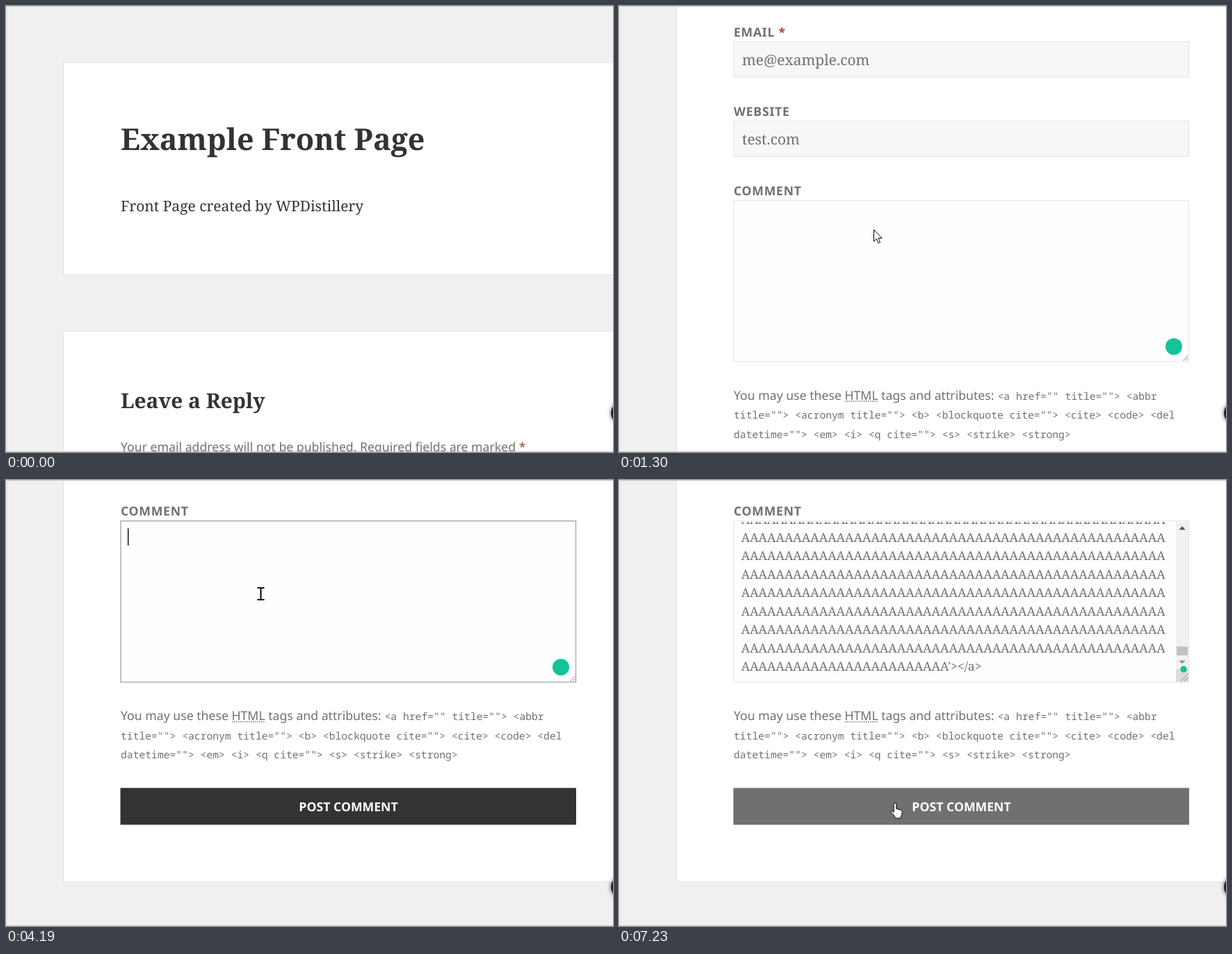
Animation of 873 by 641 pixels, one loop 8000 ms. Source, as an HTML page:

```html
<!DOCTYPE html>
<html lang="en">
<head>
<meta charset="utf-8">
<title>Comment form</title>
<style>
  html, body { margin: 0; width: 100%; height: 100%; overflow: hidden; background: #f0f0f0; }
  svg { display: block; width: 873px; height: 641px; text-rendering: geometricPrecision; }
  text { fill: #707070; font: 17.66px "Noto Sans", sans-serif; }
  .serif { font: 20.97px "Noto Serif", serif; }
  .title { font: bold 43px "Noto Serif", serif; }
  .subtitle { font: bold 29.78px "Noto Serif", serif; }
  .dark { fill: #333; }
  .label { font-weight: bold; letter-spacing: .04em; }
  .required { fill: #b3402c; }
  .code { font: 14.7px "Noto Sans Mono", monospace; }
  .card { fill: #fff; stroke: #e2e2e2; }
  .field { fill: #f7f7f7; stroke: #dfe3e3; }
  .autofill { fill: #fafdbd; stroke: #dfe2ae; }
  .submit { fill: #fff; font-weight: bold; text-anchor: middle; }
  #comment { fill: #fefefe; stroke: #e2e4e4; }
  #comment.focus { stroke: #b7b7b7; stroke-width: 1.7; }
  #pasted text { font: 17.66px "Noto Serif", serif; }
  #pasted.focus text { fill: #333; }
  .grip { stroke: #8a8a8a; fill: none; }
  .badge { fill: #15c39a; }
  #cursor path { stroke: #000; fill: #fff; }
  #cursor .ibeam { fill: none; stroke-width: 2; }
  #cursor .busy { fill: none; stroke: #3a9bdc; stroke-width: 4; }
</style>
</head>
<body>
<svg viewBox="0 0 873 641">
  <rect width="873" height="641" fill="#f0f0f0"/>
  <g id="page">
    <rect class="card" x="82.5" y="81.2" width="810" height="305"/>
    <text class="title dark" x="165" y="207">Example Front Page</text>
    <text class="serif dark" x="165" y="294.5">Front Page created by WPDistillery</text>

    <rect class="card" x="82.5" y="467.5" width="810" height="1102.5"/>
    <text class="subtitle dark" x="165" y="578">Leave a Reply</text>
    <text x="165" y="640">Your email address will not be published. Required fields are marked <tspan class="required">*</tspan></text>

    <text class="label" x="165" y="702">NAME <tspan class="required">*</tspan></text>
    <rect class="autofill" x="165" y="709.2" width="654.5" height="51"/>
    <text class="serif" x="177" y="743.3" style="fill:#000">VE</text>

    <text class="label" x="165" y="816">EMAIL <tspan class="required">*</tspan></text>
    <rect class="field" x="165" y="823.2" width="654.5" height="51"/>
    <text class="serif" x="177" y="857.3">me@example.com</text>

    <text class="label" x="165" y="930">WEBSITE</text>
    <rect class="field" x="165" y="937.3" width="654.5" height="51"/>
    <text class="serif" x="177" y="971.3">test.com</text>

    <!-- Placed relative to the fully scrolled view -->
    <g transform="translate(0 992.5)">
      <text class="label" x="165" y="51.5">COMMENT</text>
      <rect id="comment" x="165" y="58.8" width="654.5" height="231.7"/>
      <g id="empty">
        <path class="grip" d="M811.5 289l7-7M815.5 289l3-3"/>
        <circle class="badge" cx="798" cy="269" r="12"/>
      </g>
      <clipPath id="inside"><rect x="166" y="60" width="653" height="230"/></clipPath>
      <g id="pasted" clip-path="url(#inside)">
        <rect x="801" y="60" width="18" height="212" fill="#f1f1f1"/>
        <path d="M805.5 71.5h9l-4.5-5z" fill="#505050"/>
        <rect x="802" y="239.5" width="16" height="12.5" fill="#c1c1c1"/>
        <path d="M805.5 259.5h9l-4.5 4.5z" fill="#8a8a8a"/>
        <rect x="801" y="272" width="18" height="18" fill="#dcdcdc"/>
        <path class="grip" d="M808 289l10-10M813 289l5-5"/>
        <circle class="badge" cx="812" cy="272" r="4.8"/>
      </g>
      <rect id="caret"/>

      <text x="165" y="345.5">You may use these HTML tags and attributes:</text>
      <path d="M325 347.5h47" stroke="#707070" stroke-width="1.5" stroke-dasharray="1.5 1.5"/>
      <text class="code" x="544.5" y="345.5">&lt;a href="" title=""&gt; &lt;abbr</text>
      <text class="code" x="165" y="372.7">title=""&gt; &lt;acronym title=""&gt; &lt;b&gt; &lt;blockquote cite=""&gt; &lt;cite&gt; &lt;code&gt; &lt;del</text>
      <text class="code" x="165" y="400">datetime=""&gt; &lt;em&gt; &lt;i&gt; &lt;q cite=""&gt; &lt;s&gt; &lt;strike&gt; &lt;strong&gt;</text>

      <rect id="button" x="164.5" y="442.6" width="655.5" height="52.9"/>
      <text class="submit" x="492.5" y="476.3">POST COMMENT</text>
    </g>
  </g>

  <circle cx="886" cy="585" r="16" fill="#25262b" style="filter:drop-shadow(0 0 3px #0009)"/>
  <path d="M1.5 0v641" stroke="#e0e0e0"/>
  <path d="M0 .5h873M0 640.5h873" stroke="#c4c4c4"/>

  <g id="cursor">
    <path class="arrow" d="M.5.5v16.8l3.9-3.7 2.7 6.2 2.5-1.1-2.6-6h5.2z"/>
    <path class="ibeam" d="M-5-8.5h3.5l1.5 1 1.5-1H5M0-8V8M-5 8.5h3.5l1.5-1 1.5 1H5"/>
    <path class="hand" d="M-1.8 2a1.8 1.8 0 0 1 3.6 0v6.5l6.2 1.6q2.5.7 2.3 3l-.8 4.4-1.5 4.5H.5l-1.5-3.6-4.6-4.9q-.5-2 1.4-2l2.4 2z"/>
    <circle class="busy" r="11"/>
  </g>
</svg>
<script>
  const LOOP = 8000, FOCUS = 2330, PASTE = 4570, CLICK = 5450;
  const $ = id => document.getElementById(id);
  const show = (el, on) => el.style.display = on ? '' : 'none';

  // Scroll position in wheel notches
  const NOTCH = 110.28;
  const SCROLL = [[0, 0], [910, 1], [1150, 2], [1210, 6], [1300, 7], [1680, 8], [1770, 9]];

  // Pointer moves: start, end, number of hops, destination
  const ENTRY = [827, 691];
  const MOVES = [
    [360, 660, 5, 366, 321],
    [2080, 2410, 5, 324.5, 190.5],
    [2640, 3410, 11, 443, 459],
    [3480, 3790, 5, 366.5, 163.5],
    [4570, 5360, 11, 391.5, 463],
    [6230, 6230, 1, 389.5, 463],
    [7160, 7230, 2, 397, 464]
  ];

  function pointerAt(t) {
    let [x, y] = ENTRY;
    for (const [start, end, hops, toX, toY] of MOVES) {
      if (t < start) break;
      const hop = t >= end ? hops : 1 + Math.floor((t - start) / (end - start) * (hops - 1));
      x += (toX - x) * hop / hops;
      y += (toY - y) * hop / hops;
    }
    return [x, y];
  }

  function pointerKind(t, y) {
    if (t < 360) return 'none';
    if (t >= 4020 && t < 4190) return 'busy';
    if (t < 2080) return 'arrow';
    return y > 58 && y < 291 ? 'ibeam' : y > 443 ? 'hand' : 'arrow';
  }

  function addPastedText() {
    for (let row = 0; row < 9; row++) {
      const line = document.createElementNS('http://www.w3.org/2000/svg', 'text');
      line.setAttribute('x', 175.7);
      line.setAttribute('y', 274.3 - 26.47 * row);
      line.textContent = row ? 'A'.repeat(49) : 'A'.repeat(24) + "'></a>";
      $('pasted').append(line);
    }
  }

  function setCaret(x, y, width) {
    const caret = $('caret');
    caret.setAttribute('x', x);
    caret.setAttribute('y', y);
    caret.setAttribute('width', width);
    caret.setAttribute('height', 24.5);
  }

  function render(t) {
    const notches = SCROLL.filter(([time]) => time <= t).pop()[1];
    $('page').setAttribute('transform', `translate(0 ${-NOTCH * notches})`);

    const focused = t >= FOCUS && t < CLICK, pasted = t >= PASTE;
    $('comment').classList.toggle('focus', focused);
    $('pasted').classList.toggle('focus', focused);
    show($('empty'), !pasted);
    show($('pasted'), pasted);
    show($('caret'), focused);
    if (pasted) setCaret(361, 149.5, 1);
    else setCaret(175, 69.5, 1.4);
    $('button').setAttribute('fill', t < CLICK ? '#323333' : '#707070');

    const [x, y] = pointerAt(t), kind = pointerKind(t, y);
    $('cursor').setAttribute('transform', `translate(${x} ${y})`);
    for (const shape of $('cursor').children) show(shape, shape.classList.contains(kind));
  }

  function tick() {
    render(performance.now() % LOOP);
    requestAnimationFrame(tick);
  }

  addPastedText();
  tick();
</script>
</body>
</html>
```
